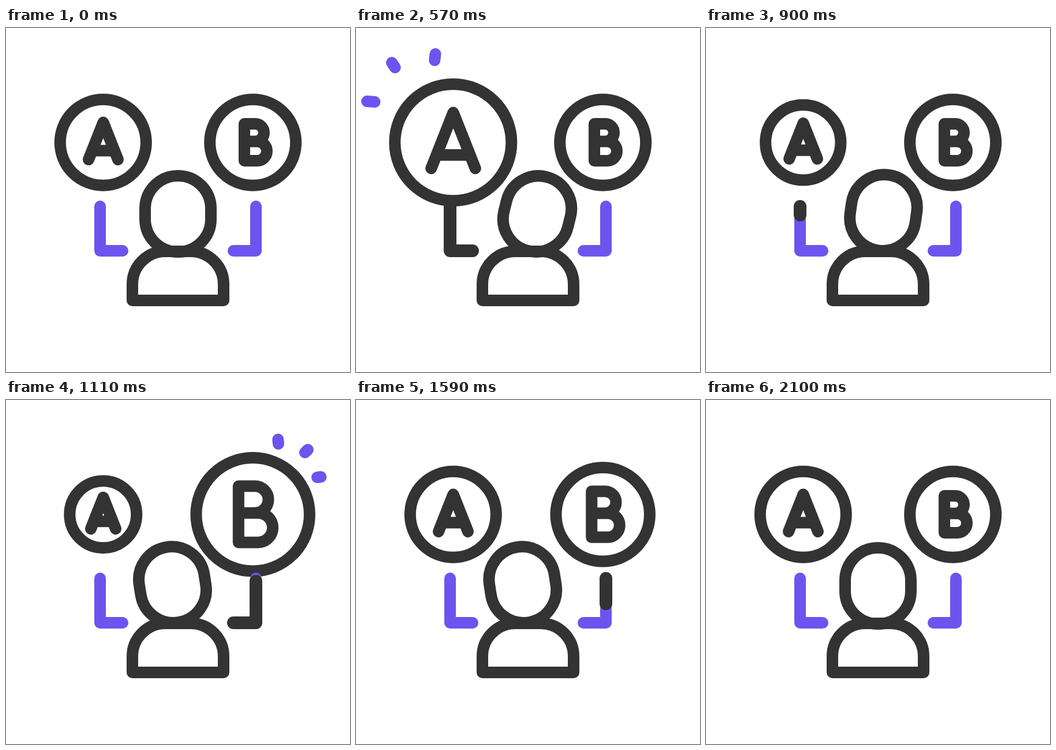
These frames come from a looping animation (596x596 px, 2250 ms). An HTML page:

```html
<!DOCTYPE html>
<html lang="en">
<head>
<meta charset="utf-8">
<title>A/B choice</title>
<style>
  html, body { margin: 0; height: 100%; overflow: hidden; background: #fff; }
  svg { display: block; width: 100vw; height: 100vh; }
  svg * { fill: none; stroke: #333; stroke-width: 20; stroke-linecap: round; stroke-linejoin: round; }
  svg .accent { stroke: #6c54ee; }
  svg .trace { stroke-width: 22; }
</style>
</head>
<body>
<svg viewBox="0 0 596 596">
  <path d="M219 472V444A57 57 0 0 1 276 387H320A57 57 0 0 1 377 444V472Z"/>
  <rect id="head" x="241" y="256" width="114" height="132" rx="57"/>
</svg>
<script>
const LOOP = 2250, STEP = 30, RADIUS = 74.5, B_DELAY = 720;
const svg = document.querySelector('svg');
const head = document.getElementById('head');

const smooth = x => x * x * (3 - 2 * x);
const cubic = x => x < 0.5 ? 4 * x ** 3 : 1 - 4 * (1 - x) ** 3;
const span = (t, from, to, ease = smooth) =>
  ease(Math.min(1, Math.max(0, (t - from) / (to - from))));

// Each key is [from, to, value]: ease to the value during that span.
const track = (t, start, keys) =>
  keys.reduce((v, [from, to, value]) => v + (value - v) * span(t, from, to, cubic), start);

function add(tag, attrs) {
  const el = document.createElementNS('http://www.w3.org/2000/svg', tag);
  for (const name in attrs) el.setAttribute(name, attrs[name]);
  return svg.appendChild(el);
}

// Shows only the part of a path between two fractions of its length.
function trim(el, start, end) {
  const length = end - start;
  el.style.display = length > 0.001 ? '' : 'none';
  el.style.strokeDasharray = `${length} 9`;
  el.style.strokeDashoffset = -start;
}

function makeOption({ cx, letter, lx, ly, peak, link, rays }) {
  const ring = add('circle', { cx, cy: 198.3 });
  const glyph = add('path', { d: letter });
  add('path', { d: link, class: 'accent' });
  const trace = add('path', { d: link, class: 'trace', pathLength: 1 });
  const bursts = rays.map(d => add('path', { d, class: 'accent', pathLength: 1 }));

  return t => {
    const size = (top, low) => track(t, 1, [[200, 470, top], [780, 966, low], [1040, 1380, 1]]);
    const scale = size(peak, 0.84);
    ring.setAttribute('r', RADIUS * size(1.356, 0.77));
    glyph.setAttribute('transform', `translate(${lx} ${ly}) scale(${scale})`);
    glyph.style.strokeWidth = 20 / scale;
    trim(trace, span(t, 780, 935), span(t, 180, 420));
    for (const ray of bursts) trim(ray, span(t, 450, 650), span(t, 345, 510));
  };
}

const optionA = makeOption({
  cx: 168.3, lx: 168.5, ly: 197.5, peak: 1.5,
  letter: 'M-25.5 30.5L0 -34L25.5 30.5M-19.5 15H19.5',
  link: 'M202 386H163V309',
  rays: ['M57 130L19 127', 'M78 84L62 60', 'M134 76L137.5 45']
});
const optionB = makeOption({
  cx: 427.7, lx: 432.5, ly: 198, peak: 1.58,
  letter: 'M-19.5 -32H-.75a15.25 15.25 0 0 1 0 30.5H2.75a16.75 16.75 0 0 1 0 33.5H-19.5ZM-19.5 -1.5H2.75',
  link: 'M394 386H433V309',
  rays: ['M539 134L575 130', 'M518 91L545 64', 'M472 76L468 34']
});

function moveHead(t) {
  const swing = (right, left) => track(t, 0, [[180, 480, right], [780, 1080, left], [1530, 1830, 0]]);
  const lift = track(t, 0, [[780, 900, -2], [1530, 1830, 0]]);
  head.setAttribute('transform',
    `translate(${swing(16, -9.5)} ${lift}) rotate(${swing(14, -9)} 298 322)`);
}

function draw(now) {
  const t = Math.floor(now % LOOP / STEP) * STEP;
  optionA(t);
  optionB(t - B_DELAY);
  moveHead(t);
}

const began = performance.now();
function frame() {
  draw(performance.now() - began);
  requestAnimationFrame(frame);
}
frame();
</script>
</body>
</html>
```
